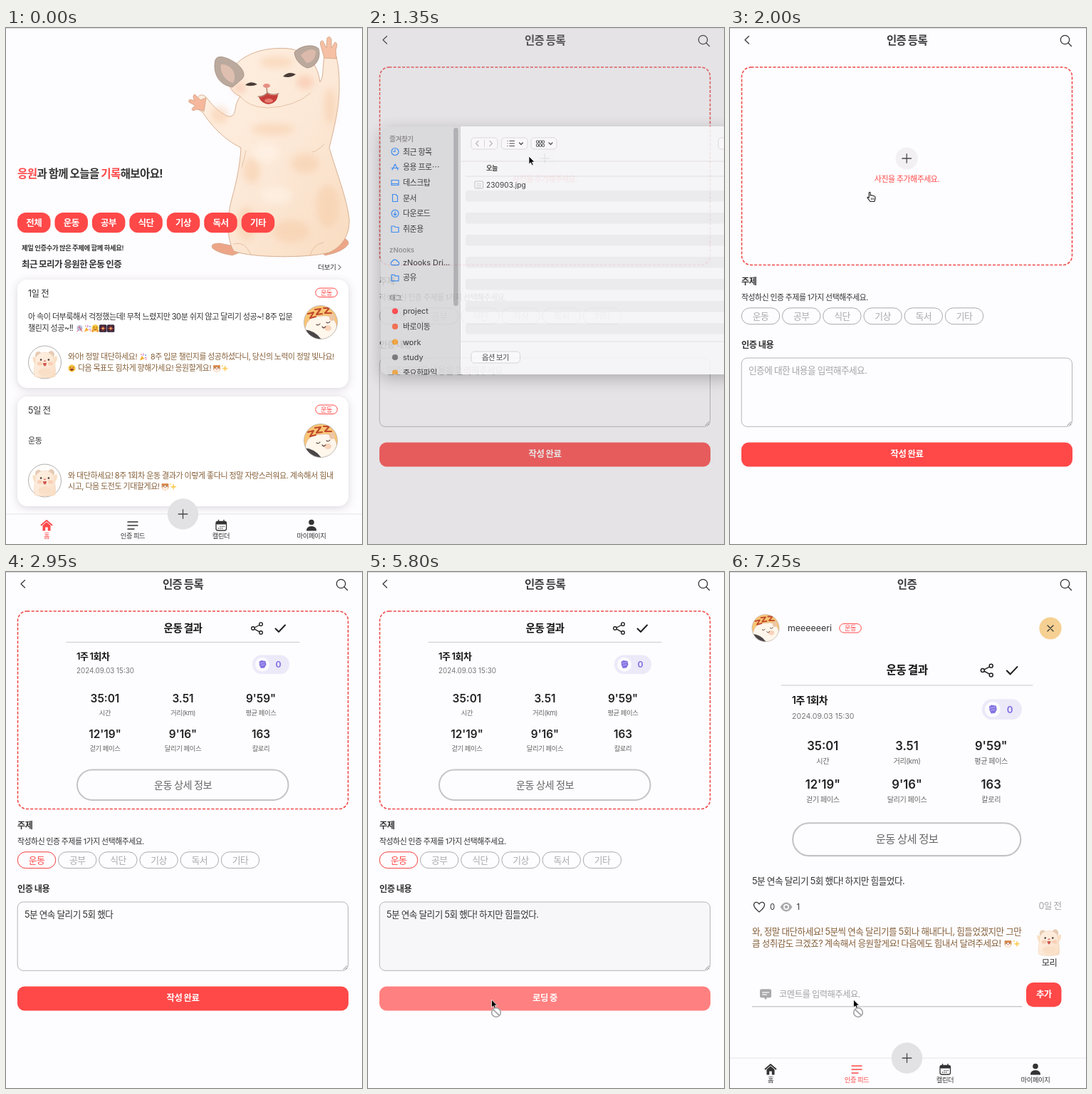
Recreate the animation shown at these times as an HTML page. Size 500 px wide and 724 px high, loop 7.9 s.

```html
<!DOCTYPE html>
<html lang="ko">
<head>
<meta charset="utf-8">
<title>인증 등록</title>
<style>
  html, body { margin: 0; width: 100%; height: 100%; overflow: hidden; background: #fdfcfe; }
  svg { display: block; }
  #stage { width: 100vw; height: 100vh; }
  text { font-family: Inter, "Noto Sans CJK KR", "Noto Sans CJK", sans-serif; white-space: pre; }
  .ko { letter-spacing: -.04em; word-spacing: -.03em; }
  .card { fill: #fff; filter: drop-shadow(0 2px 6px rgba(40, 30, 60, .17)); }
  .line { fill: none; stroke-linecap: round; stroke-linejoin: round; }
</style>
</head>
<body>
<svg id="stage" viewBox="0 0 500 724"></svg>
<script>
const RED = '#ff4848', INK = '#333', BROWN = '#86603a', PALE = '#a3a2a5';
const LOOP = 7900, STEP = 50;

// Drawing helpers
const text = (x, y, size, str, { c = INK, w = 400, a = 'start', id = '' } = {}) =>
  `<text x="${x}" y="${y}" font-size="${size}" fill="${c}" font-weight="${w}" text-anchor="${a}"` +
  `${id && ` id="${id}"`}${/[가-힣]/.test(str) || id ? ' class="ko"' : ''}>${str}</text>`;
const mid = (x, y, size, str, o) => text(x, y, size, str, { a: 'middle', ...o });
const box = (x, y, w, h, r, fill, more = '') =>
  `<rect x="${x}" y="${y}" width="${w}" height="${h}" rx="${r}" fill="${fill}" ${more}/>`;
const dot = (x, y, r, fill, more = '') => `<circle cx="${x}" cy="${y}" r="${r}" fill="${fill}" ${more}/>`;
const oval = (x, y, rx, ry, fill, more = '') =>
  `<ellipse cx="${x}" cy="${y}" rx="${rx}" ry="${ry}" fill="${fill}" ${more}/>`;
const line = (d, c = INK, w = 1.3) => `<path class="line" d="${d}" stroke="${c}" stroke-width="${w}"/>`;
const area = (d, fill, more = '') => `<path d="${d}" fill="${fill}" ${more}/>`;
const at = (x, y, s, body) => `<g transform="translate(${x} ${y}) scale(${s})">${body}</g>`;
const group = (id, body) => `<g id="${id}">${body}</g>`;
const stroke = (c, w = 1) => `stroke="${c}" stroke-width="${w}"`;
const plus = (x, y, r) => line(`M${x - r} ${y}h${2 * r}M${x} ${y - r}v${2 * r}`, '#4a494c');

// Small pictures in an 11 by 11 box
const emoji = {
  party: area('M1 10.5L3.6 4L7.5 8Z', '#f3b23c') + line('M5 4Q7 3 6 1M8 7Q10 5 10.5 7', '#b75ad0', 1) +
    dot(3, 2, .8, '#e8554f') + dot(9, 3, .9, '#4b9be0') + dot(9.6, 9, .7, '#e8554f'),
  ball: dot(5.5, 5, 4, '#b8c6e6') + line('M2 10L4 7M9 10L7 7M3 4L8 6M5 2L7 8', '#dc6b7c', 1),
  hug: dot(5.5, 5, 4.8, '#f8c43d') + dot(3.8, 4, .7, '#6b3d14') + dot(7.2, 4, .7, '#6b3d14') +
    line('M3.5 6.5Q5.5 8.5 7.5 6.5', '#8a3a20', 1) + dot(2, 9, 1.7, '#f29a38') + dot(9, 9, 1.7, '#f29a38'),
  smile: dot(5.5, 5.5, 5, '#f7bd3d') + dot(3.8, 4.3, .7, '#6b3d14') + dot(7.2, 4.3, .7, '#6b3d14') +
    area('M2.8 6h5.4Q7.6 9 5.5 9T2.8 6', '#8a3a20'),
  spark: box(.3, .3, 10.4, 10.4, 1.5, '#33243a') + line('M5.5 2v7M2 5.5h7M3 3l5 5M8 3L3 8', '#e2543e', .9) + dot(5.5, 5.5, 1.2, '#ffd166'),
  pet: dot(2.2, 2.6, 1.7, '#c9773c') + dot(8.8, 2.6, 1.7, '#c9773c') + oval(5.5, 5.8, 5, 4.8, '#dc8a4a') +
    oval(5.5, 7.2, 4, 3.2, '#fff1e4') + dot(3.4, 5, .8, '#3a2418') + dot(7.6, 5, .8, '#3a2418') + dot(5.5, 6.6, .8, '#d4506a'),
  stars: area('M6 1L7.2 4.6L10.8 5.8L7.2 7L6 10.6L4.8 7L1.2 5.8L4.8 4.6Z', '#fbcf63') + dot(2, 2, 1, '#fbcf63')
};
const icons = (x, y, names, pitch = 11.2) =>
  names.split(' ').map((n, i) => at(x + i * pitch, y, 1, emoji[n])).join('');

const defs = `<defs>
  <linearGradient id="fur" x1="0" y1="0" x2="1" y2="1"><stop stop-color="#fff0e2"/><stop offset=".55" stop-color="#fce8d6"/><stop offset="1" stop-color="#f9dcc0"/></linearGradient>
  <filter id="soft" x="-50%" y="-50%" width="200%" height="200%"><feGaussianBlur stdDeviation="5"/></filter>
  <clipPath id="disc"><circle r="23.5"/></clipPath>
  <clipPath id="sheet"><rect x="18" y="138" width="500" height="348" rx="9"/></clipPath>
</defs>`;

const edge = stroke('#d3a888', .9);
const blotch = (x, y, rx, ry, c = '#f6cba6') => oval(x, y, rx, ry, c, 'filter="url(#soft)" opacity=".5"');
const hamster =
  area('M300 302Q286 302 290 309Q298 316 318 319L340 310Z', '#eda588', edge) +
  area('M462 292Q482 294 481 303Q474 314 448 319L436 308Z', '#eda588', edge) +
  area('M329 96C318 110 326 125 312 124C298 118 288 106 281 97C276 92 270 93 268 101C262 108 268 114 276 118C288 136 304 155 330 168' +
    'C329 190 324 215 317 240C311 262 309 296 320 313C345 323 425 323 454 315C474 306 483 288 482 268C479 240 464 202 454 168' +
    'C461 140 469 108 468 78C468 60 466 50 464 40L448 36C444 50 447 68 441 76C438 52 424 33 398 29C366 26 337 35 322 52C308 68 310 88 329 96Z', 'url(#fur)', edge) +
  blotch(345, 200, 12, 18) + blotch(420, 190, 20, 14) + blotch(452, 250, 16, 30) + blotch(338, 275, 14, 24) + blotch(380, 235, 22, 12, '#fff6ec') +
  blotch(400, 285, 26, 16) + blotch(455, 110, 8, 26) + blotch(375, 142, 30, 8) + blotch(300, 122, 12, 12) + blotch(380, 48, 24, 8) +
  blotch(328, 84, 9, 8, '#f6b99c') + blotch(420, 76, 12, 10, '#f6b99c') + blotch(365, 175, 18, 14, '#fff6ec') +
  area('M318 83C298 80 290 62 294 45C297 36 312 42 321 48C332 55 338 66 331 72Z', '#bba99d', stroke('#a08a7c', .8)) +
  area('M319 77C307 74 300 61 302 51C314 50 326 62 319 77Z', '#dfbfb0') +
  area('M405 34C414 24 432 22 439 29C443 42 435 55 423 56C414 53 406 45 405 34Z', '#bba99d', stroke('#a08a7c', .8)) +
  area('M414 38C422 30 432 28 435 33C435 43 429 49 422 49Z', '#dcbaab') +
  area('M281 98L273 101L265 93Q261 95 265 102Q255 98 257 104L266 109Q258 114 263 116Q270 112 278 117Z', '#f6b79c', edge) +
  area('M447 42L443 28Q439 17 445 18L450 28L451 14Q455 10 457 16L457 28L462 20Q467 21 463 31L464 43Z', '#f6c0a4', edge) +
  area('M336 80Q344 73 353 79Q345 83 336 80Z', '#493b36') + area('M389 68Q397 60 407 65Q399 71 389 68Z', '#493b36') +
  oval(366, 81, 5, 3, '#e88f84') + line('M366 84L367 91M354 96Q361 97 367 91Q374 95 383 92', '#9b6650', 1.1) +
  area('M355 97Q362 97 367 92Q375 96 382 93Q381 106 368 107Q358 105 355 97Z', '#c53f3a') + oval(369, 102, 6, 3, '#e97b70') +
  line('M329 96Q340 111 367 112Q405 111 428 91M337 172Q334 186 331 195M447 163Q437 173 430 174M320 303Q335 298 344 318M446 301Q432 303 427 319', '#dfb898', .8);

const pup =
  area('M-15 3Q-21 -7 -18 -10Q-13 -9 -11 -1M15 3Q22 -8 18 -11Q12 -9 11 -1', '#fae0c4') +
  oval(-10, -12, 5, 6, '#e6cab4') + oval(10, -13, 5, 6, '#e6cab4') +
  area('M-15 -3C-15 -21 15 -21 15 -3C15 3 18 10 16 21C8 24 -8 24 -16 21C-18 10 -15 3 -15 -3Z', 'url(#fur)', stroke('#ecd0b4', .6)) +
  oval(-8, 1, 4, 3, '#f8d0b6') + oval(9, 1, 4, 3, '#f8d0b6') + dot(-6, -5, 1.4, '#40332e') + dot(6, -5, 1.4, '#40332e') +
  oval(0, -3, 1.8, 1.2, '#df7f75') + area('M-3 0h6Q2 5 0 5T-3 0', '#d05b52') + oval(0, 14, 10, 6, '#f9dfc6');
const petFace = (x, y) => at(x, y, 1, dot(0, 0, 23, '#fffdfb', stroke('#a9a6a6', .9)) + at(0, 1, .9, pup));

const sleeper = (x, y, s = 1) => at(x, y, s,
  `<g clip-path="url(#disc)">${dot(0, 0, 24, '#fac574')}
  ${area('M-22 20C-24 -4 -12 -9 3 -9C12 -11 23 -5 23 10L20 26H-20Z', '#fff6ec', stroke('#dcb797', .8))}
  ${oval(16, -7, 4, 5, '#ecc6a6')}${oval(10, 8, 5, 4, '#f9d3ba')}
  ${line('M-6 3q3 2 5 -1M8 0q3 2 5 -1M2 6l2 2l3 -2', '#5a3b30', 1.1)}
  ${area('M-24 10Q-8 11 1 24H-24Z', '#4a4648')}
  ${line('M-18 -12l8 -2l-5 8l8 -2M-8 -18l8 -1l-6 8l8 -1M4 -20l8 0l-6 7l9 0', '#bf4a2c', 2.2)}</g>` +
  `<circle r="23.5" fill="none" stroke="#a9a6a6" stroke-width=".7"/>`);

const badge = (x, y) => box(x, y, 30.5, 12.5, 6.2, 'none', stroke(RED)) + mid(x + 15.2, y + 9.6, 9.2, '운동', { c: RED });
const finder = dot(470.5, 16.5, 6.2, 'none', stroke(INK, 1.3)) + line('M475 21l4.5 4.5');
const title = str => mid(248.5, 23, 15.5, str, { w: 700, c: '#3c3b3d' });

function nav(active) {
  const c = i => i === active ? RED : INK;
  const label = (x, str, i) => mid(x, 716, 9.3, str, { c: c(i), w: 500 });
  return box(0, 682, 500, 42, 0, '#fdfcfe') + line('M0 682H500', '#e5e3e6', 1) +
    line('M49.5 697.5L57 691L64.5 697.5', c(0), 1.8) + area('M51.5 698L57 693.2L62.5 698V705.5H58.8V700.5H55.2V705.5H51.5Z', c(0)) +
    line('M171 693h14M171 698h14M171 703h9', c(1), 1.4) +
    box(295, 692.5, 14.5, 12.5, 2.5, 'none', stroke(INK, 1.3)) + box(295, 692.5, 14.5, 4, 1.5, INK) + line('M298.5 690.5v3M306 690.5v3', INK, 1.4) +
    line('M298.5 702h.1M301 702h.1M303.5 702h.1M301 699.5h.1M303.5 699.5h.1M306 699.5h.1', INK, 1.4) +
    dot(429, 693.5, 3.8, INK) + area('M422 705.5Q422 699 429 699T436 705.5Z', INK) +
    label(57, '홈', 0) + label(178, '인증 피드', 1) + label(302, '캘린더', 2) + label(429, '마이페이지', 3) +
    dot(248.5, 682, 21.7, '#e2e1e4') + plus(248.5, 682, 6.3);
}

const card = (y, h, day) => `<rect class="card" x="16" y="${y}" width="465" height="${h}" rx="14"/>` +
  text(31, y + 24, 12.5, day) + badge(434.8, y + 12);
const home = hamster +
  text(16, 210, 15.55, `<tspan fill="${RED}">응원</tspan>과 함께 오늘을 <tspan fill="${RED}">기록</tspan>해보아요!`, { w: 700 }) +
  ['전체', '운동', '공부', '식단', '기상', '독서', '기타'].map((s, i) =>
    box(16 + i * 52.45, 259, 46.5, 28.2, 12, RED) + mid(39.2 + i * 52.45, 277.5, 12.5, s, { c: '#fff', w: 700 })).join('') +
  text(22, 312, 9.4, '제일 인증수가 많은 주제에 함께 하세요!', { w: 600 }) +
  text(22, 336, 12.5, '최근 모리가 응원한 운동 인증', { w: 700 }) +
  text(438, 339, 9.6, '더보기') + line('M467 332.5l3 3.2l-3 3.2', INK, 1) +
  card(353, 152, '1일 전') + sleeper(442, 413) + petFace(54.5, 469) +
  text(31, 409, 11.07, '아 속이 더부룩해서 걱정했는데! 무척 느렸지만 30분 쉬지 않고 달리기 성공~! 8주 입문') +
  text(31, 425, 11.07, '챌린지 성공~!!') + icons(98, 416, 'ball party hug spark spark', 10.9) +
  text(87, 465, 11, '와아! 정말 대단하세요!', { c: BROWN }) + icons(187, 456, 'party') +
  text(203, 465, 10.9, '8주 입문 챌린지를 성공하셨다니, 당신의 노력이 정말 빛나요!', { c: BROWN }) +
  icons(87, 472, 'smile') + text(101, 481, 10.9, '다음 목표도 힘차게 향해가세요! 응원할게요!', { c: BROWN }) + icons(290.5, 472, 'pet stars') +
  card(517, 154, '5일 전') + sleeper(442, 579) + petFace(54.5, 635) + text(31, 583, 11, '운동') +
  text(87, 632, 11.07, '와 대단하세요! 8주 1회차 운동 결과가 이렇게 좋다니 정말 자랑스러워요. 계속해서 힘내', { c: BROWN }) +
  text(87, 647, 11, '시고, 다음 도전도 기대할게요!', { c: BROWN }) + icons(218, 638, 'pet stars') + nav(0);

const stats = [['35:01', '시간'], ['3.51', '거리(km)'], ['9\'59"', '평균 페이스'], ['12\'19"', '걷기 페이스'], ['9\'16"', '달리기 페이스'], ['163', '칼로리']];
const ring = (x, y) => dot(x, y, 2.3, 'none', stroke('#222', 1.4));
const result =
  mid(248.5, 84, 14.6, '운동 결과', { w: 700, c: '#151515' }) +
  line('M355.8 74.5L349.2 78M349.2 80.2L355.8 83.8', '#222', 1.4) + ring(358, 73.2) + ring(347, 79) + ring(358, 85) +
  line('M378.5 79.5l4.5 4.5l9 -9.5', '#222', 2) + line('M85 98.5H412', '#cbcacd', 1) +
  text(99, 123, 12.9, '1주 1회차', { w: 600, c: '#151515' }) + text(99, 142, 9.8, '2024.09.03 15:30', { c: '#777' }) +
  box(346, 116.5, 52, 26.5, 13.2, '#ece9f9') + dot(360, 129.8, 10, '#fcfbff') +
  area('M355.5 126l3 -2l6 1l1 5l-2.5 4.5l-5 .5l-2 -4z', '#8272e2') + line('M357 128l6 -1M358 131l5 -1', '#d5cef8', .7) +
  mid(382.5, 134.3, 12.3, '0', { c: '#7c6be0', w: 600 }) +
  stats.map(([v, s], i) => {
    const x = 139 + i % 3 * 109.5, y = 183 + Math.floor(i / 3) * 50;
    return mid(x, y, 15.4, v, { w: 600, c: '#222' }) + mid(x, y + 17.5, 9.4, s, { c: '#666' });
  }).join('') +
  box(100, 277.5, 296.5, 42.5, 21.2, 'none', stroke('#c4c3c6', 2)) + mid(248.5, 303.5, 14.2, '운동 상세 정보', { c: '#666' });

const note = '5분 연속 달리기 5회 했다! 하지만 힘들었다.';
const chip = (s, i, c) => box(16.3 + i * 57.2, 392.8, 53.4, 22.8, 11.4, '#fdfcfe', stroke(c)) + mid(43 + i * 57.2, 408.5, 12.8, s, { c });
const register = line('M26.5 11.5L21 16.7L26.5 22', INK, 1.2) + title('인증 등록') + finder +
  box(16.5, 55, 464, 277.5, 13, 'none', stroke('#f04a4a', 1.6) + ' stroke-dasharray="4 2.2"') +
  group('empty', dot(248.2, 183, 15.6, '#f2f0f3') + plus(248.2, 183, 6.3) + mid(248.5, 216, 10.9, '사진을 추가해주세요.', { c: RED })) +
  group('photo', result) +
  text(16, 360, 12.1, '주제', { w: 600 }) + text(16, 382, 10.85, '작성하신 인증 주제를 1가지 선택해주세요.') +
  ['운동', '공부', '식단', '기상', '독서', '기타'].map((s, i) => chip(s, i, '#aaa9ac')).join('') + group('picked', chip('운동', 0, RED)) +
  text(16, 449, 12.2, '인증 내용', { w: 600 }) +
  box(16.2, 463, 464.3, 96.3, 8, 'none', stroke('#b5b4b8') + ' id="field"') + line('M474 557.5l5 -5M477 557.5l2 -2', '#777', .9) +
  text(26, 484.5, 12.6, '', { id: 'entry' }) +
  box(16, 581.5, 465, 34, 10, RED, 'id="send"') + mid(248.5, 602.3, 12.4, '작성 완료', { c: '#fff', w: 600, id: 'sendText' });

// File chooser
const side = (y, str, icon) => text(49, y, 10.9, str, { c: '#252528' }) + at(38, y - 4, 1, icon);
const head = (y, str) => text(30, y, 9.6, str, { c: '#87868b', w: 600 });
const blue = d => line(d, '#2680ee', 1.2);
const pill = (x, w) => box(x, 154, w, 16, 4.5, '#fcfbfd', stroke('#d4d3d6', .9));
const down = x => line(`M${x - 2.5} 161l2.5 2.5l2.5 -2.5`, INK, 1.2);
const folder = blue('M-5 -4h4l1 1.5h5v7h-10z');
const chooser = `<rect x="18" y="138" width="500" height="348" rx="9" fill="#f8f7f9" style="filter:drop-shadow(0 6px 11px rgba(0,0,0,.28))"/>
  <g clip-path="url(#sheet)">` + box(18, 138, 111, 348, 0, '#d9d8db') + line('M129.5 138V486', '#cbcacd', 1) + box(120.2, 140, 6.5, 250, 3.2, '#aaa9ad') +
  head(159, '즐겨찾기') + side(177.5, '최근 항목', dot(0, 0, 5, 'none', stroke('#2680ee', 1.2)) + blue('M0 -3V0H-2.5')) +
  side(199, '응용 프로⋯', blue('M-4 4L0 -4L4 4M-5 1.5H5')) + side(221, '데스크탑', blue('M-5 -3.5h10v7h-10zM-5 1.5h10')) +
  side(242.5, '문서', blue('M-3.5 -5h4.5l2.5 2.5v7.5h-7z')) +
  side(264.3, '다운로드', dot(0, 0, 5, 'none', stroke('#2680ee', 1.2)) + blue('M0 -2.5V2.5M-2 .7L0 2.6L2 .7')) + side(286, '취준용', folder) +
  head(315, 'zNooks') + side(332.7, 'zNooks Dri...', blue('M-4 4a2.6 2.6 0 0 1 0 -5a4 4 0 0 1 7.5 0a2.6 2.6 0 0 1 .5 5z')) + side(354.3, '공유', folder) +
  head(382, '태그') +
  [['project', '#ff3b3f'], ['바로이동', '#f4603f'], ['work', '#f5a032'], ['study', '#6d6c70'], ['중요한파일', '#eda13c']]
    .map(([s, c], i) => side(401.3 + i * 21.6, s, dot(0, 0, 4.1, c))).join('') +
  pill(145, 37) + line('M163.5 157v10', '#d4d3d6', 1) + line('M155 158.5l-3.5 3.5l3.5 3.5M171 158.5l3.5 3.5l-3.5 3.5', '#b0afb3', 1.2) +
  pill(187.5, 36.5) + line('M199 158.5h6.5M199 162h6.5M199 165.5h6.5M196 158.5h.1M196 162h.1M196 165.5h.1', INK, 1.2) + down(215) +
  pill(229, 36) + [0, 1, 2, 3, 4, 5].map(i => box(236.5 + i % 3 * 4, 158 + (i > 2) * 5, 3, 3.3, .4, 'none', stroke(INK, .9))).join('') + down(256.5) + pill(492, 30) +
  line('M130 187H500M137 208H500M130 440H500', '#dfdee1', 1) + text(166, 200, 9.2, '오늘', { w: 600 }) +
  [0, 1, 2, 3, 4, 5, 6].map(i => box(137, 228 + i * 31, 380, 15.5, 4, '#edecef')).join('') +
  box(150, 215, 11.5, 10, 1, '#fff', stroke('#aaa9ad', .8)) + line('M152.5 218h6.5M152.5 220.5h6.5M152.5 223h6.5', '#b9b8bc', .8) +
  text(166, 224, 10.2, '230903.jpg', { c: '#252528' }) +
  box(145, 454, 68.5, 16, 4.5, '#fdfcfe', stroke('#d0cfd3', .9)) + mid(179, 465.7, 10.2, '옵션 보기') + '</g>';

const detail = title('인증') + finder + sleeper(50, 78.7, .81) + text(81, 83.3, 12.4, 'meeeeeeri') + badge(153.8, 72.6) +
  dot(450, 79, 15.6, '#f5d092') + line('M446 75l8 8M454 75l-8 8', INK, 1.2) +
  group('blank', box(62.3, 113, 372, 298, 8, '#c2c1c3')) + group('loaded', at(-19.76, 52.7, 1.0795, result)) +
  text(31, 438, 12.65, note) +
  line('M41 477C36 473 33.5 470.5 33.5 467.3C33.5 462.5 39 462 41 466C43 462 48.5 462.5 48.5 467.3C48.5 470.5 46 473 41 477Z', INK, 1.3) +
  text(56, 474, 11.3, '0') + area('M70.5 470Q74.5 463.5 79 463.5T87.5 470Q83.5 476.5 79 476.5T70.5 470Z', '#a9a8ab') +
  dot(79, 470, 4, '#fdfcfe') + dot(79, 470, 2.3, '#a9a8ab') + text(93.5, 474, 11.3, '1') +
  text(465.5, 472.5, 12.5, '0일 전', { c: PALE, a: 'end' }) +
  group('waiting', mid(248.5, 509.3, 12.4, '동물 친구에게 응원의 메시지를 받아오고 있어요.', { c: BROWN, w: 500 })) +
  group('cheer', text(31, 509.3, 12.55, '와, 정말 대단하세요! 5분씩 연속 달리기를 5회나 해내다니, 힘들었겠지만 그만', { c: BROWN }) +
    text(31, 525.5, 12.5, '큼 성취감도 크겠죠? 계속해서 응원할게요! 다음에도 힘내서 달려주세요!', { c: BROWN }) + icons(385, 516, 'pet stars', 12) +
    at(448, 518, .88, pup) + mid(448.5, 553, 12.3, '모리')) +
  group('comment', area('M44 542h12q2 0 2 2v8q0 2 -2 2h-4l-2 3l-2 -3h-4q-2 0 -2 -2v-8q0 -2 2 -2z', '#aaa9ac') + line('M45.5 546.5h9M45.5 549.5h6', '#fdfcfe', 1.2) +
    text(69, 553.5, 12.3, '코멘트를 입력해주세요.', { c: PALE }) + line('M31.5 566.5H410', '#b3b2b5', 1) +
    box(416, 532.7, 49.5, 34.3, 10, RED) + mid(440.8, 554.2, 12.4, '추가', { c: '#fff', w: 600 })) + nav(1);

const pointer = group('arrow', area('M0 0V11.2L2.5 8.8L4.3 12.8L6.2 12L4.5 8.1H8Z', '#000', stroke('#fff', .8))) +
  group('hand', area('M2.2 6.5V1.2Q3.2 -.5 4.2 1.2V5Q5.5 4 6.5 5.2Q8 4.5 8.8 5.8Q10.8 5.5 11 7.5V10L9.8 13.5H4L0 8.2Q-.2 6.5 2.2 8Z', '#fff', stroke('#222', 1.1)) + line('M5.4 8.5v2.5M7.2 8.5v2.5M9 8.5v2.5', '#222', .7)) +
  group('barred', dot(6.5, 18, 6.3, '#fff', stroke('#aaa9ac', 1.8)) + line('M2.2 14L10.8 22', '#aaa9ac', 1.8));

document.getElementById('stage').innerHTML = defs + group('home', home) + group('register', register) +
  group('detail', detail) + group('dim', box(0, 0, 500, 724, 0, '#9a999c')) + group('chooser', chooser) +
  line('M0 .5H500', '#dad8dc', 1) + group('pointer', pointer);

// Timeline
const $ = Object.fromEntries([...document.querySelectorAll('#stage [id]')].map(e => [e.id, e]));
const show = (id, on) => { $[id].style.display = on ? '' : 'none'; };
const path = [[50, 300, 724], [250, 247, 683], [450, 247, 683], [800, 226, 180], [1350, 226, 180], [1600, 193, 222],
  [1850, 193, 222], [2000, 193, 230], [2200, 193, 230], [2450, 42, 402], [2600, 42, 402], [2750, 120, 488],
  [3100, 120, 488], [3250, 173.5, 600]];

function along(keys, t) {
  const i = keys.findIndex(k => k[0] > t);
  if (i === 0) return keys[0].slice(1);
  if (i < 0) return keys[keys.length - 1].slice(1);
  const a = keys[i - 1], b = keys[i], p = (t - a[0]) / (b[0] - a[0]), e = p * p * (3 - 2 * p);
  return a.slice(1).map((v, k) => v + (b[k + 1] - v) * e);
}

function draw(t) {
  const loading = t >= 3400, typing = t >= 2750 && t < 3150, answered = t >= 6800, imageReady = t >= 6400;
  show('home', t < 450);
  show('register', t >= 450 && t < 5950);
  show('detail', t >= 5950);
  show('empty', t < 2150);
  show('photo', t >= 2150);
  show('picked', t >= 2550);

  $.dim.style.opacity = along([[1250, 0], [1350, .25], [1850, .25], [1950, 0]], t)[0];
  $.chooser.style.opacity = along([[1250, 0], [1350, .87], [1400, 1], [1850, 1], [1950, 0]], t)[0];

  const count = Math.max(0, Math.min(note.length, Math.ceil((t - 2750) / 350 * note.length)));
  $.entry.textContent = count ? note.slice(0, count) : '인증에 대한 내용을 입력해주세요.';
  $.entry.setAttribute('fill', count ? INK : PALE);
  $.entry.setAttribute('font-size', 12.6);
  $.field.setAttribute('fill', loading ? '#f7f6f9' : '#fdfcfe');
  $.send.setAttribute('fill', loading ? '#ff8080' : RED);
  $.sendText.textContent = loading ? '로딩 중' : '작성 완료';

  show('blank', !imageReady);
  show('loaded', imageReady);
  show('waiting', !answered);
  show('cheer', answered);
  $.comment.setAttribute('transform', `translate(0 ${answered ? 43.3 : 0})`);

  const choosing = t >= 1300 && t < 1900;
  const overLink = !choosing && !loading && !(t > 2600 && t < 3200);
  const [x, y] = along(path, t);
  $.pointer.setAttribute('transform', `translate(${x} ${y})`);
  show('pointer', t >= 50 && !typing);
  show('hand', overLink);
  show('arrow', !overLink);
  show('barred', loading);
}

const start = performance.now();
function tick() {
  const t = (performance.now() - start) % LOOP;
  draw(Math.floor(t / STEP) * STEP);
  requestAnimationFrame(tick);
}
tick();
</script>
</body>
</html>
```
